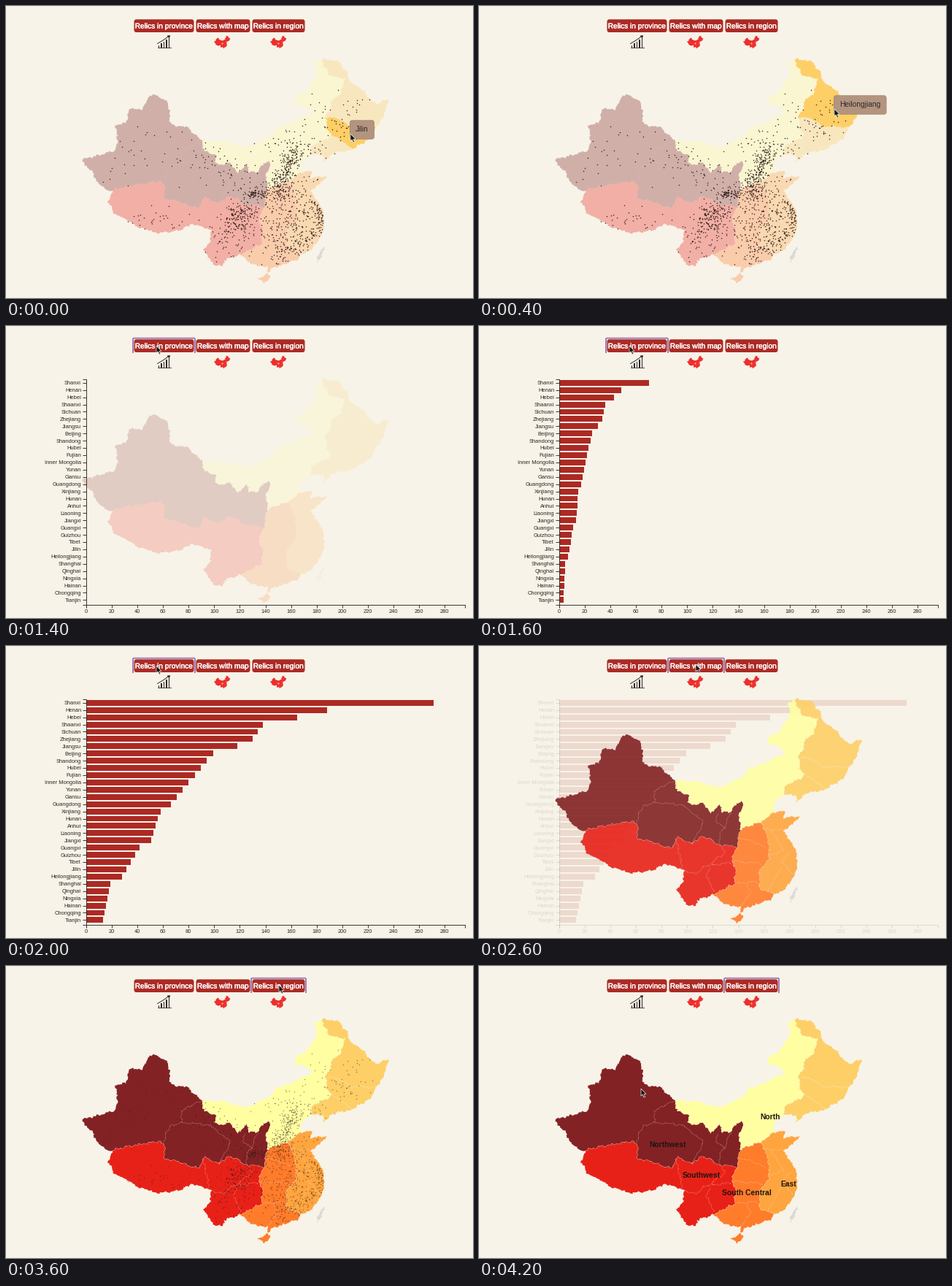
A matplotlib script that plays this animation: 640 px wide and 400 px high, repeating every 4400 ms.

```python
import numpy as np
import matplotlib.pyplot as plt
from matplotlib.animation import FuncAnimation
from matplotlib.collections import LineCollection
from matplotlib.patches import FancyBboxPatch, Polygon, Rectangle
from matplotlib.path import Path
from matplotlib.patheffects import withStroke

FRAMES, STEP = 22, 200
PT = 0.72  # points per pixel at 100 dpi
BG, BRICK, INK = "#f7f3e8", "#ac2a24", "#2a2623"
plt.rcParams["font.family"] = "Liberation Sans"

fig = plt.figure(figsize=(6.4, 4), dpi=100, facecolor=BG)
ax = fig.add_axes([0, 0, 1, 1])
ax.axis("off")


# ---------- geography ----------
def line(*nums):
    """Line through a few key points, roughened by an offset that depends on
    position only, so neighbouring regions keep a common border."""
    p = np.array(nums, float).reshape(-1, 2)
    out = [p[:1]]
    for a, b in zip(p[:-1], p[1:]):
        n = max(2, int(np.hypot(*(b - a)) / 1.3))
        out.append(a + (b - a) * np.linspace(0, 1, n + 1)[1:, None])
    x, y = np.vstack(out).T
    dx, dy = 0, 0
    for freq, amp in [(0.45, 0.8), (1.1, 0.7), (2.1, 0.6)]:
        dx = dx + amp * np.sin(freq * (x + 0.6 * y))
        dy = dy + amp * np.sin(freq * (0.7 * x - y) + 1)
    return np.column_stack([x + dx, y + dy])


def join(*lines):
    return np.vstack(lines)


xj_north = line(106, 210, 135, 202, 149, 198, 153, 186, 150, 163, 165, 160,
                168, 141, 185, 141, 196, 122, 203, 122, 222, 132, 226, 162,
                248, 166, 268, 184)
xj_south = line(145, 253, 136, 250, 124, 239, 117, 225, 108, 218, 106, 210)
nw_im = line(268, 184, 272, 199, 288, 205, 286, 214, 300, 218, 306, 213,
             318, 230, 330, 216, 333, 228, 345, 227, 349, 218, 362, 213)
nw_north = line(362, 213, 357, 232, 358, 251)
nw_sc = line(358, 251, 354, 275)
nw_sw = line(354, 275, 326, 272, 316, 264, 303, 262, 293, 271, 273, 261,
             265, 277, 237, 269, 217, 263, 217, 246, 212, 240, 185, 244,
             165, 247, 145, 253)
sw_outer = line(145, 253, 140, 268, 148, 284, 169, 294, 183, 304, 211, 311,
                236, 308, 254, 299, 280, 306, 281, 322, 271, 335, 285, 354,
                298, 356, 299, 348, 320, 341)
sw_sc = line(354, 275, 346, 290, 352, 308, 350, 326, 320, 341)
sc_coast = line(320, 341, 336, 354, 358, 357, 358, 365, 366, 359, 400, 347,
                404, 340)
sc_east = line(404, 340, 385, 333, 384, 311, 398, 290, 396, 262, 386, 241)
sc_north = line(386, 241, 358, 251)
e_coast = line(404, 340, 414, 337, 430, 318, 437, 297, 433, 276, 417, 254,
               441, 233, 418, 235, 420, 227, 405, 227)
e_north = line(405, 227, 386, 241)
bohai = line(405, 227, 402, 215, 418, 204)
im_top = line(432, 73, 424, 79, 426, 95, 410, 118, 399, 123, 395, 134,
              410, 137, 421, 146, 405, 153, 390, 161, 373, 166, 366, 177,
              329, 194, 300, 186, 268, 184)
w_ln = line(418, 204, 419, 192, 447, 178)
w_jl = line(447, 178, 440, 168, 438, 152)
w_hlj = line(438, 152, 446, 140, 446, 130, 459, 120, 465, 99, 443, 96,
             432, 73)
hlj_coast = line(432, 73, 455, 75, 469, 92, 471, 104, 490, 116, 498, 126,
                 506, 134, 524, 128, 514, 161, 506, 166)
jl_coast = line(506, 166, 501, 180, 474, 197)
ln_coast = line(474, 197, 450, 201, 433, 215, 436, 204, 418, 204)
hlj_jl = line(438, 152, 450, 153, 470, 165, 506, 166)
jl_ln = line(447, 178, 462, 186, 474, 197)

GOLD, ORANGE = "#fdcf66", "#ff7c2b"
regions = [
    ("NW", "#832224", join(xj_north, nw_im, nw_north, nw_sc, nw_sw,
                           xj_south)),
    ("North", "#ffffa2", join(nw_im, nw_north, sc_north[::-1],
                              e_north[::-1], bohai, w_ln, w_jl, w_hlj,
                              im_top)),
    ("SW", "#e82118", join(sw_sc, sw_outer[::-1], nw_sw[::-1])),
    ("SC", ORANGE, join(sc_north[::-1], sc_east[::-1], sc_coast[::-1],
                        sw_sc[::-1], nw_sc[::-1])),
    ("East", "#ffa53f", join(e_coast, e_north, sc_east[::-1])),
    ("Heilongjiang", GOLD, join(hlj_coast, hlj_jl[::-1], w_hlj)),
    ("Jilin", GOLD, join(hlj_jl, jl_coast, jl_ln[::-1], w_jl)),
    ("Liaoning", GOLD, join(jl_ln, ln_coast, w_ln)),
    ("Hainan", ORANGE, line(346, 374, 357, 367, 362, 371, 354, 381, 346, 374)),
]
land = {name: ax.add_patch(Polygon(pts, fc=color, lw=0, zorder=2))
        for name, color, pts in regions}
island = ax.add_patch(Polygon(
    line(436, 329, 434, 343, 428, 352, 425, 345, 436, 329), fc="#d9d9d9",
    lw=0, zorder=2))

borders = [
    line(268, 184, 241, 198, 240, 214),
    line(216, 243, 224, 220, 240, 214, 280, 218, 307, 240, 293, 271),
    line(326, 230, 325, 239, 338, 248, 345, 228),
    line(338, 248, 331, 256, 329, 272),
    line(270, 264, 279, 306, 298, 313, 309, 301, 346, 297),
    line(333, 275, 337, 283, 320, 296, 322, 302),
    line(318, 303, 312, 315, 322, 337),
    line(357, 262, 394, 276),
    line(347, 295, 389, 298),
    line(351, 325, 382, 323),
    line(367, 327, 372, 338, 358, 357),
    line(391, 250, 416, 253),
    line(401, 254, 418, 280, 398, 287),
    line(427, 282, 414, 296, 430, 312),
    line(415, 302, 396, 334),
    nw_im, nw_north, nw_sc, nw_sw, sw_sc, sc_east, sc_north, e_north,
    w_ln, w_jl, w_hlj, hlj_jl, jl_ln,
]
border_art = LineCollection(borders, colors="#fff0dc", linewidths=0.4,
                            zorder=3)
ax.add_collection(border_art)

# ---------- relic dots scattered along a few routes ----------
ROUTES = [  # count, start, end, spread
    (210, (400, 198), (372, 252), 7),
    (80, (362, 250), (392, 264), 9),
    (70, (334, 257), (356, 255), 4),
    (110, (325, 280), (312, 296), 9),
    (150, (300, 335), (345, 262), 18),
    (170, (412, 240), (402, 325), 15),
    (80, (424, 278), (433, 295), 6),
    (80, (428, 308), (376, 346), 6),
    (110, (376, 278), (366, 345), 14),
    (75, (375, 195), (425, 205), 14),
    (60, (440, 185), (490, 140), 18),
    (45, (320, 195), (440, 140), 20),
    (60, (260, 205), (340, 245), 14),
    (45, (120, 205), (260, 190), 24),
    (35, (170, 290), (260, 296), 9),
]
rng = np.random.default_rng(7)
paths = [Path(pts) for _, _, pts in regions]
dots = []
for n, start, end, spread in ROUTES:
    cloud = (np.array(start) + rng.random((n, 1)) * np.subtract(end, start)
             + rng.normal(0, spread, (n, 2)))
    dots.append(cloud[np.any([p.contains_points(cloud, radius=2)
                              for p in paths], axis=0)])
dot_art = ax.scatter(*np.vstack(dots).T, s=1.25, c="#2b1613", lw=0, zorder=4)


# ---------- text, buttons, icons ----------
def text(x, y, s, px, **kw):
    kw.setdefault("color", INK)
    return ax.text(x, y, s, fontsize=px * PT, **kw)


label_art = [
    text(x, y + 3.7, s, 10.2, weight="bold", ha="center", color="#1d1510",
         zorder=5)
    for s, x, y in [("North", 399, 206), ("Northwest", 259, 244.5),
                    ("Southwest", 305, 286.5), ("South Central", 367, 310),
                    ("East", 424.5, 298)]]

rings = []
for s, x0, x1 in [("Relics in province", 175, 258),
                  ("Relics with map", 260, 335),
                  ("Relics in region", 337, 410)]:
    ax.add_patch(FancyBboxPatch((x0 + 0.5, 18.3), x1 - x0 - 1, 17.7, fc=BRICK,
                                boxstyle="round,pad=0,rounding_size=3", lw=0,
                                zorder=6))
    text((x0 + x1) / 2, 30.6, s, 10.1, color="white", ha="center", zorder=7,
         path_effects=[withStroke(linewidth=0.25, foreground="white")])
    rings += ax.plot([x0 - 1, x0 - 1, x0, x1, x1 + 1, x1 + 1],
                     [36, 17.5, 16.7, 16.7, 17.5, 36], color="#a27bb4",
                     lw=1.4, zorder=6.5)

for i in range(5):
    h = 3 + 2.6 * i
    ax.add_patch(Rectangle((208.5 + 3.5 * i, 57 - h), 1.9, h, fc=INK, lw=0))
ax.plot([207.5, 225.5], [57.2, 57.2], color=INK, lw=0.6)
ax.plot([207.5, 216, 223], [51.5, 46.5, 41.5], color=INK, lw=0.65)
ax.add_patch(Polygon([(220.5, 40.7), (225, 40), (224, 44.5)], fc=INK, lw=0))

for x in (285.5, 362.5):
    for _, _, pts in regions:
        mini = (pts - (106, 72)) * (0.0515, 0.054) + (x, 41.2)
        ax.add_patch(Polygon(mini, fc="#ee2c2c", ec="#ee2c2c", lw=0.3))
    ax.plot(x + 10, 51, ".", ms=1.3, color="#ffc04a")

# ---------- bar chart ----------
NAMES = ("Shanxi,Henan,Hebei,Shaanxi,Sichuan,Zhejiang,Jiangsu,Beijing,"
         "Shandong,Hubei,Fujian,Inner Mongolia,Yunan,Gansu,Guangdong,"
         "Xinjiang,Hunan,Anhui,Liaoning,Jiangxi,Guangxi,Guizhou,Tibet,Jilin,"
         "Heilongjiang,Shanghai,Qinghai,Ningxia,Hainan,Chongqing,"
         "Tianjin").split(",")
X0, UNIT = 109.7, 1.756
rank = np.arange(len(NAMES))
rows = 77.8 + 9.92 * rank
# counts fall with rank, straight between the visible steps
full = UNIT * np.interp(rank, [0, 1, 2, 3, 5, 6, 7, 14, 15, 19, 20, 24, 25, 30],
                        [271, 188, 165, 138, 130, 118, 99, 66, 58, 51, 42, 28,
                         19, 13])
bars = ax.barh(rows, full, 7.9, left=X0, color=BRICK, lw=0, zorder=1)

segs = [[(105, 72.5), (X0, 72.5), (X0, 381.5), (105, 381.5)],
        [(X0, 386), (X0, 381.5), (629, 381.5), (629, 386)]]
chart = list(bars)
for y, name in zip(rows, NAMES):
    segs.append([(105, y), (X0, y)])
    chart.append(text(103, y + 2.4, name, 7.5, ha="right", zorder=1))
for v in range(0, 281, 20):
    x = X0 + UNIT * v
    segs.append([(x, 381.5), (x, 385.5)])
    chart.append(text(x, 393, str(v), 7.5, ha="center", zorder=1))
axis_art = LineCollection(segs, colors=INK, linewidths=0.65, zorder=1.1)
ax.add_collection(axis_art)
chart.append(axis_art)
ax.set_xlim(0, 640)
ax.set_ylim(400, 0)

# ---------- tooltip and pointer ----------
tip = text(0, 0, "", 10.2, color="#2f2a28", va="center", zorder=8,
           bbox=dict(boxstyle="round,pad=0.76,rounding_size=0.3",
                     fc="#b3957f", ec="#a08068", lw=0.5))
ARROW = np.array([(0, 0), (0, 10), (2.3, 8), (4, 12), (5.7, 11.3), (4, 7.5),
                  (7, 7.3)])
pointer = ax.add_patch(Polygon(ARROW, fc="#151515", ec="white", lw=0.45,
                               zorder=9))

# pointer stops: ms, x, y
STOPS = np.array([
    (0, 472, 175), (400, 487, 141), (1000, 206, 27), (2200, 206, 27),
    (2400, 262, 8), (2600, 297, 25), (3200, 311, 55), (3400, 352, 9),
    (3600, 374, 26), (3800, 374, 26), (4200, 222, 168)])


# ---------- timeline ----------
def ramp(t, start, end):
    """Smooth rise from 0 to 1 between two times."""
    u = np.clip((t - start) / (end - start), 0, 1)
    return u * u * (3 - 2 * u)


def draw(i):
    t = i * STEP
    hover = "Jilin" if t < 400 else "Heilongjiang" if t < 600 else None

    to_bars, to_map = ramp(t, 1000, 1550), ramp(t, 2400, 2600)
    shade = (0.32 + 0.68 * ramp(t, 400, 800)) * (1 - to_bars)
    shade += 0.9 * to_map + 0.1 * ramp(t, 3400, 3600)
    for name, patch in land.items():
        patch.set_alpha(1 if name == hover else shade)
    island.set_alpha(1 if hover else shade)
    border_art.set_alpha(0.36 * shade)
    dot_art.set_alpha(0.85 * (1 - ramp(t, 1000, 1400) + ramp(t, 2600, 3200)
                              - ramp(t, 3400, 3800)))

    chart_alpha = (ramp(t, 1000, 1400) - 0.87 * to_map
                   - 0.13 * ramp(t, 2600, 2800))
    for art in chart:
        art.set_alpha(max(0, chart_alpha))
    for bar, w in zip(bars, full * ramp(t, 1400, 2000)):
        bar.set_width(w)
    for art in label_art:
        art.set_alpha(ramp(t, 3600, 4000))

    focus = -1 + (t >= 1000) + (t >= 2600) + (t >= 3600)
    for k, ring in enumerate(rings):
        ring.set_visible(k == focus)

    x, y = (np.interp(t, STOPS[:, 0], STOPS[:, k]) for k in (1, 2))
    pointer.set_xy(ARROW + (x, y))
    tip.set_visible(hover is not None)
    tip.set_text(hover or "")
    tip.set_position((x + 7, y - 5.5))
    return []


anim = FuncAnimation(fig, draw, frames=FRAMES, interval=STEP, repeat=True,
                     repeat_delay=0, blit=False)
plt.show()
```
